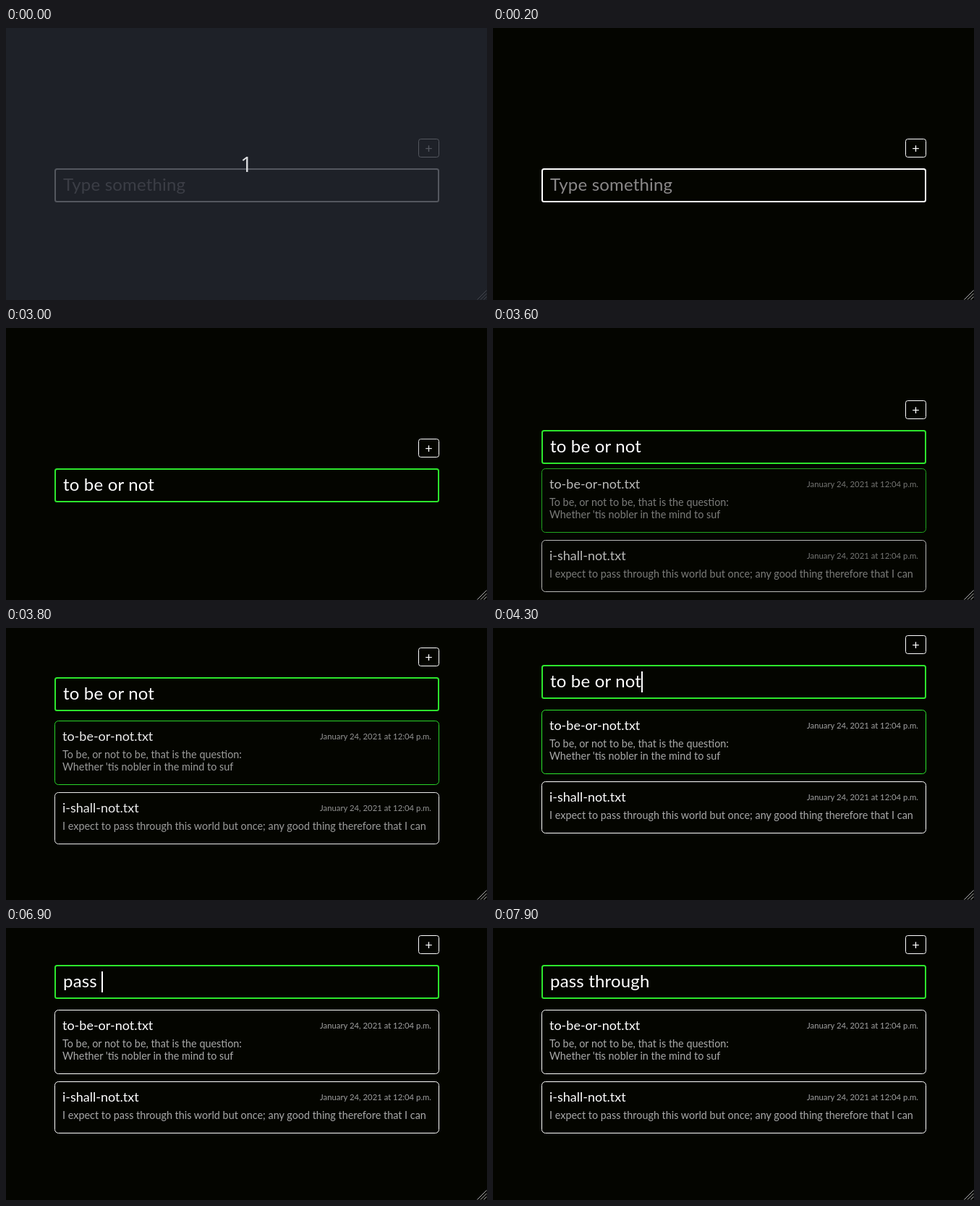
Write an HTML page that moves like this. It is 665 by 376 pixels and loops after 8000 ms.

```html
<!DOCTYPE html>
<html lang="en">
<head>
<meta charset="utf-8">
<title>Note search</title>
<style>
  html, body { margin: 0; width: 100%; height: 100%; overflow: hidden; background: #040500; }
  svg { display: block; width: 665px; height: 376px; }
  text { font-family: Lato, "Open Sans", sans-serif; fill: #fff; white-space: pre; }
  .box { fill: none; stroke: #fff; }
  .query { font-size: 24px; letter-spacing: .18px; }
  .title { font-size: 18px; }
  .date { font-size: 11.3px; fill: #a0a0a0; text-anchor: end; }
  .body { font-size: 14.4px; fill: #a9a9a9; }
  .plus { font-size: 18px; text-anchor: middle; }
  .count { font: 30px "Open Sans", "Noto Sans", sans-serif; fill: #dcdde0; text-anchor: middle; }
</style>
</head>
<body>
<svg viewBox="0 0 665 376" width="665" height="376">
  <rect width="665" height="376" fill="#040500"/>
  <g id="search">
    <rect class="box" x="570.5" y="-40.5" width="28" height="25" rx="3"/>
    <text class="plus" x="584.5" y="-21">+</text>
    <rect id="field" class="box" x="68" y="1" width="530" height="45" rx="2.5" stroke-width="2"/>
    <text id="query" class="query" x="79" y="31"></text>
    <rect id="caret" y="9" width="2" height="29" fill="#fff"/>
  </g>
  <g id="list">
    <g>
      <rect id="first" class="box" x="67.5" y=".5" width="531" height="88" rx="5"/>
      <text class="title" x="78" y="28">to-be-or-not.txt</text>
      <text class="date" x="588" y="26">January 24, 2021 at 12:04 p.m.</text>
      <text class="body" x="78" y="52">To be, or not to be, that is the question:</text>
      <text class="body" x="78" y="69">Whether 'tis nobler in the mind to suf</text>
    </g>
    <g transform="translate(0 99)">
      <rect class="box" x="67.5" y=".5" width="531" height="71" rx="5"/>
      <text class="title" x="78" y="28">i-shall-not.txt</text>
      <text class="date" x="588" y="26">January 24, 2021 at 12:04 p.m.</text>
      <text class="body" x="78" y="52">I expect to pass through this world but once; any good thing therefore that I can</text>
    </g>
  </g>
  <path d="M651.5 375.5L664.5 362.5M656 375.5L664.5 367M660.5 375.5L664.5 371.5" stroke="#b4b4b4" fill="none"/>
  <g id="countdown">
    <rect width="665" height="376" fill="#262a33" opacity=".785"/>
    <text class="count" x="332.5" y="199">1</text>
  </g>
</svg>
<script>
const LOOP = 8000;
const GREEN = '#2de62d';
const $ = id => document.getElementById(id);

// [time, text in the field]
const typing = [
  [0, ''], [1200, 'to'], [1300, 'to '], [1600, 'to be'],
  ...[...' or not'].map((_, i, s) => [1800 + i * 100, 'to be' + s.slice(0, i + 1).join('')]),
  [5700, ''], [6200, 'p'], [6300, 'pa'], [6600, 'pas'], [6700, 'pass'],
  [6900, 'pass '], [7000, 'pass t'], [7200, 'pass th'], [7400, 'pass thr'],
  [7500, 'pass thro'], [7700, 'pass throu'], [7800, 'pass through']
];

// [time, field top, list top, list opacity]
const layout = [
  [0, 194, 376, 0], [3500, 172, 222, .3], [3600, 141, 194, .72],
  [3800, 68, 128, .92], [3900, 51, 113, 1]
];

// [time, caret shown]
const blinks = [[0, 0], [600, 1], [3000, 0], [4300, 1], [5500, 0], [5700, 1], [7900, 0]];

const at = (steps, t) => steps.filter(s => s[0] <= t).pop();

function draw(t) {
  const text = at(typing, t)[1];
  const [, top, listTop, alpha] = at(layout, t);
  const query = $('query');

  query.textContent = text;
  const end = text ? query.getComputedTextLength() : 0;
  if (!text) query.textContent = 'Type something';
  query.style.fill = text ? '#fff' : '#8a8888';

  $('caret').setAttribute('x', Math.round(79 + end));
  $('caret').setAttribute('opacity', at(blinks, t)[1]);
  $('field').style.stroke = t < 600 ? '#fff' : GREEN;
  $('first').style.stroke = t < 5800 ? GREEN : '#fff';
  $('search').setAttribute('transform', `translate(0 ${top})`);
  $('list').setAttribute('transform', `translate(0 ${listTop})`);
  $('list').setAttribute('opacity', alpha);
  $('countdown').setAttribute('opacity', t < 200 ? 1 : 0);
}

const start = performance.now();
function tick() {
  draw((performance.now() - start) % LOOP);
  requestAnimationFrame(tick);
}
tick();
</script>
</body>
</html>
```
